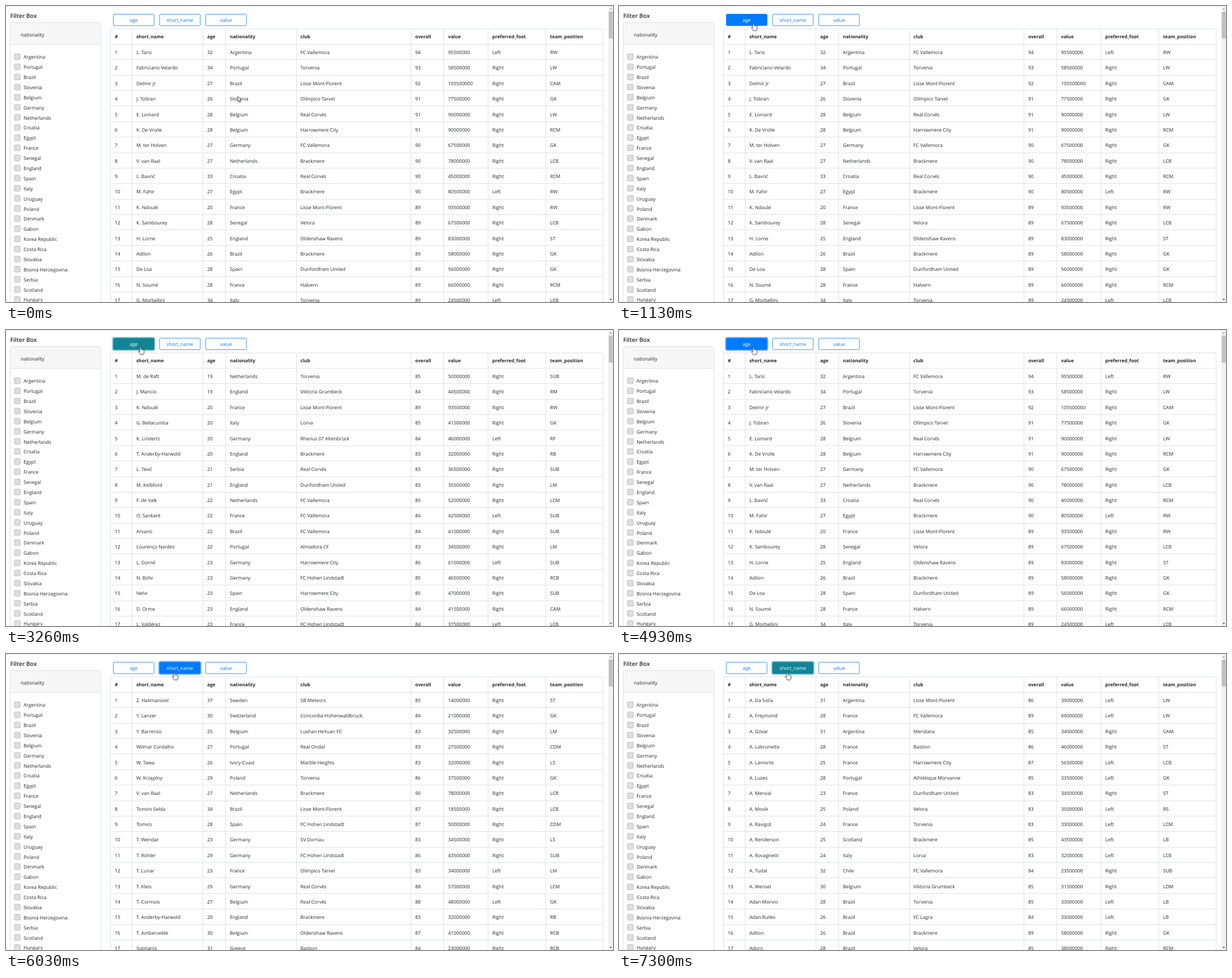
An HTML page that plays this animation: 1071 by 523 pixels, repeating every 8000 ms.

```html
<!DOCTYPE html>
<html lang="en">
<head>
<meta charset="utf-8">
<title>Filter and sort table</title>
<style>
:root { --blue: #007bff; --clear: #007bff00; --line: #3395ff; --teal: #138496; --ring: #007bff80; --tealring: #17a2b880; }
html, body { margin: 0; width: 100%; height: 100%; overflow: hidden; background: #fff; }
svg { display: block; width: 1071px; height: 523px; }
text { font: 8.46px 'Open Sans', sans-serif; fill: #212529; text-rendering: geometricPrecision; white-space: pre; }
.title { font-size: 10.3px; font-weight: 600; }
.head { font-size: 8.2px; font-weight: 700; }
.grid { fill: none; stroke: #dee2e6; }
.box { fill: #dedede; stroke: #b9b9b9; stroke-width: .9; }
.button { fill: var(--clear); stroke: var(--line); }
.label { fill: var(--blue); text-anchor: middle; }
.ring { fill: none; stroke: var(--clear); stroke-width: 1.8; }
.hand, .arrow { fill: #fff; stroke: #111; stroke-width: .8; stroke-linejoin: round; }

.view, .hand, .arrow, #pointer, .button, .label, .ring { animation: 8s ease-in-out infinite; }
.view, .hand, .arrow { animation-timing-function: step-end; }
.view { visibility: hidden; }
#ranked { animation-name: ranked; }
#oldest { animation-name: oldest; }
#youngest { animation-name: youngest; }
#za { animation-name: za; }
#az { animation-name: az; }
@keyframes ranked { 0%, 53.75% { visibility: visible } 28.75%, 75.125%, 100% { visibility: hidden } }
@keyframes oldest { 28.75% { visibility: visible } 0%, 38.75%, 100% { visibility: hidden } }
@keyframes youngest { 38.75% { visibility: visible } 0%, 53.75%, 100% { visibility: hidden } }
@keyframes za { 75.125% { visibility: visible } 0%, 88.75%, 100% { visibility: hidden } }
@keyframes az { 0% { visibility: hidden } 88.75%, 100% { visibility: visible } }

#pointer { animation-name: move; }
.hand { animation-name: hand; }
.arrow { animation-name: arrow; }
@keyframes move {
  0%, 3.75% { transform: translate(408.7px, 159.5px); animation-timing-function: ease; }
  14.125%, 61.6% { transform: translate(237.2px, 29.5px); animation-timing-function: ease-in; }
  64.375% { transform: translate(256px, 35.5px); animation-timing-function: linear; }
  66.875% { transform: translate(282px, 41px); animation-timing-function: linear; }
  69.175% { transform: translate(296.5px, 34px); animation-timing-function: ease-out; }
  70.75%, 100% { transform: translate(297.2px, 31.8px); }
}
@keyframes hand { 0%, 64.375% { visibility: hidden } 11.75%, 69.175%, 100% { visibility: visible } }
@keyframes arrow { 0%, 64.375% { visibility: visible } 11.75%, 69.175%, 100% { visibility: hidden } }

#age .button { animation-name: age-fill; }
#age .label { animation-name: age-text; }
#age .ring { animation-name: age-ring; }
@keyframes age-fill {
  0%, 11.75%, 66.25%, 100% { fill: var(--clear); stroke: var(--line); }
  13.625%, 38.75%, 55.625%, 64.375% { fill: var(--blue); stroke: var(--blue); }
  40.625%, 53.75% { fill: var(--teal); stroke: var(--teal); }
}
@keyframes age-text {
  0%, 11.75%, 66.25%, 100% { fill: var(--blue); }
  13.625%, 64.375% { fill: #fff; }
}
@keyframes age-ring {
  0%, 26.6%, 75.125%, 100% { stroke: var(--clear); }
  27.375%, 38.75%, 55.625%, 73.25% { stroke: var(--ring); }
  40.625%, 53.75% { stroke: var(--tealring); }
}

#short_name .button { animation-name: name-fill; }
#short_name .label { animation-name: name-text; }
#short_name .ring { animation-name: name-ring; }
@keyframes name-fill {
  0%, 69.175% { fill: var(--clear); stroke: var(--line); }
  71.05%, 88.75% { fill: var(--blue); stroke: var(--blue); }
  90.625%, 100% { fill: var(--teal); stroke: var(--teal); }
}
@keyframes name-text { 0%, 69.175% { fill: var(--blue) } 71.05%, 100% { fill: #fff } }
@keyframes name-ring {
  0%, 73.25% { stroke: var(--clear); }
  75.125%, 88.75% { stroke: var(--ring); }
  90.625%, 100% { stroke: var(--tealring); }
}
</style>
</head>
<body>
<svg id="stage" viewBox="0 0 1071 523"></svg>
<script>
const countries = ['Argentina', 'Portugal', 'Brazil', 'Slovenia', 'Belgium', 'Germany', 'Netherlands',
  'Croatia', 'Egypt', 'France', 'Senegal', 'England', 'Spain', 'Italy', 'Uruguay', 'Poland', 'Denmark',
  'Gabon', 'Korea Republic', 'Costa Rica', 'Slovakia', 'Bosnia Herzegovina', 'Serbia', 'Scotland', 'Hungary'];

// name | age | nationality | club | overall | value in millions | foot | position
const players = `L. Tarsi|32|Argentina|FC Vallemora|94|95.5|L|RW
Fabriciano Velardo|34|Portugal|Torvenia|93|58.5|R|LW
Delmir Jr|27|Brazil|Lisse Mont-Florent|92|105.5|R|CAM
J. Tobran|26|Slovenia|Olímpico Tarvel|91|77.5|R|GK
E. Lomard|28|Belgium|Real Corvés|91|90|R|LW
K. De Vrolle|28|Belgium|Harrowmere City|91|90|R|RCM
M. ter Holven|27|Germany|FC Vallemora|90|67.5|R|GK
V. van Raal|27|Netherlands|Brackmere|90|78|R|LCB
L. Bavrić|33|Croatia|Real Corvés|90|45|R|RCM
M. Fahir|27|Egypt|Brackmere|90|80.5|L|RW
K. Ndoulé|20|France|Lisse Mont-Florent|89|93.5|R|RW
K. Sambourey|28|Senegal|Velora|89|67.5|R|LCB
H. Lorne|25|England|Oldenshaw Ravens|89|83|R|ST
Adilon|26|Brazil|Brackmere|89|58|R|GK
De Loa|28|Spain|Dunfordham United|89|56|R|GK
N. Soumé|28|France|Halvern|89|66|R|RCM
G. Morbellini|34|Italy|Torvenia|89|24.5|L|LCB
Severo Lamos|33|Spain|Real Corvés|89|31.5|R|LCB
L. Soldez|32|Uruguay|FC Vallemora|89|53|R|ST
A. Freymond|28|France|FC Vallemora|89|69|L|LW
S. Vandarič|34|Slovenia|Solen|88|26|R|GK
M. Nauber|33|Germany|FC Hohen Lindstadt|88|32|R|GK
D. Gadén|33|Uruguay|Solen|88|28|R|CB
Damián Solva|33|Spain|Harrowmere City|88|40|L|LCM
Prade|32|Spain|FC Vallemora|88|42|R|RCB
E. Caloni|32|Uruguay|Lisse Mont-Florent|88|48|R|ST
T. Kleis|29|Germany|Real Corvés|88|57|R|LCM
T. Cormois|27|Belgium|Real Corvés|88|48|L|GK
Jorlandinho|34|Brazil|Harrowmere City|87|19.5|R|CDM
Tomiro Selda|34|Brazil|Lisse Mont-Florent|87|18.5|R|LCB
Tomiro|28|Spain|FC Hohen Lindstadt|87|50|R|CDM
T. Ambervelde|30|Belgium|Oldenshaw Ravens|87|41|R|RCB
A. Lamorte|25|France|Harrowmere City|87|56.5|L|LCB
W. Krzęplny|29|Poland|Torvenia|86|37.5|R|GK
T. Röhler|29|Germany|FC Hohen Lindstadt|86|43.5|R|SUB
A. Da Solía|31|Argentina|Lisse Mont-Florent|86|39|L|LW
A. Labrunette|28|France|Bastion|86|46|R|ST
L. Dorné|23|Germany|Harrowmere City|86|61|L|SUB
Z. Halimanović|37|Sweden|SB Meteors|85|14|R|ST
M. de Raft|19|Netherlands|Torvenia|85|50|R|SUB
G. Bellacumba|20|Italy|Lorva|85|41.5|R|GK
F. de Valk|22|Netherlands|FC Vallemora|85|52|R|LCM
N. Böhr|23|Germany|FC Hohen Lindstadt|85|46.5|R|RCB
Nelvi|23|Spain|Harrowmere City|85|47|R|SUB
A. Góvar|31|Argentina|Meridana|85|34|R|CAM
A. Luzes|28|Portugal|Athlétique Morvanne|85|33.5|L|GK
A. Renderson|25|Scotland|Brackmere|85|43.5|L|LB
A. Wensel|30|Belgium|Viktoria Grumbeck|85|31.5|R|LDM
Adan Morvio|28|Brazil|Torvenia|85|33|L|LB
Adoro|28|Brazil|Velora|85|38|R|RCM
F. Bragadella|36|Italy|Calvadria|84|12.5|R|ST
E. Bražo|33|Bosnia Herzegovina|Nuva|84|20|R|ST
J. Mancio|19|England|Viktoria Grumbeck|84|44.5|R|RM
K. Lindertz|20|Germany|Rhenus 07 Altenbrück|84|46|L|RF
O. Sankaré|22|France|FC Vallemora|84|42.5|L|SUB
Arvano|22|Brazil|FC Vallemora|84|41|R|SUB
D. Orme|23|England|Oldenshaw Ravens|84|41.5|R|CAM
L. Valdérez|23|France|FC Hohen Lindstadt|84|37.5|L|LCB
Y. Lanzer|30|Switzerland|Concordia Hohenwaldbrück|84|21|R|GK
Sophanis|31|Greece|Bastion|84|23|R|RCB
A. Tudal|32|Chile|FC Vallemora|84|23.5|R|SUB
Adan Rulles|26|Brazil|FC Lagra|84|33|L|LB
T. Anderby-Harwold|20|England|Brackmere|83|32|R|RB
L. Tević|21|Serbia|Real Corvés|83|36.5|R|SUB
M. Kelbford|21|England|Dunfordham United|83|35.5|R|LM
Lourenço Nardes|22|Portugal|Almadora CF|83|34.5|R|LM
Y. Barrenzo|25|Belgium|Lushan HeYuan FC|83|32.5|R|LM
Wilmar Cordalho|27|Portugal|Real Ondal|83|27.5|R|CDM
W. Tawa|26|Ivory Coast|Marble Heights|83|32|R|LS
T. Wendar|23|Germany|SV Dornau|83|34.5|R|LS
T. Lunar|23|France|Olímpico Tarvel|83|34|L|LM
A. Mervial|23|France|Dunfordham United|83|34.5|R|ST
A. Mosik|25|Poland|Velora|83|35|L|RS
A. Ravigot|24|France|Torvenia|83|33|L|LCM
A. Rovagnetti|24|Italy|Lorva|83|32|L|LCB`.split('\n').map(line => {
  const [name, age, nation, club, overall, millions, foot, position] = line.split('|');
  return [name, age, nation, club, overall, millions * 1e6, foot === 'L' ? 'Left' : 'Right', position];
});

const byAge = (a, b) => a[1] - b[1];
const byName = (a, b) => a[0] < b[0] ? -1 : 1;
const views = {
  ranked: () => 0,
  oldest: (a, b) => byAge(b, a),
  youngest: byAge,
  za: (a, b) => byName(b, a),
  az: byName
};

const headings = ['#', 'short_name', 'age', 'nationality', 'club', 'overall', 'value', 'preferred_foot', 'team_position'];
const columns = [184.5, 222.5, 347.5, 387.5, 512, 714.5, 772.5, 850.5, 952.5];
const rowHeight = 27.38;

const text = (x, y, content, style = '') => `<text x="${x}" y="${y}" class="${style}">${content}</text>`;
const rect = (x, y, w, h, attrs) => `<rect x="${x}" y="${y}" width="${w}" height="${h}" ${attrs}/>`;
const cells = (values, y, style) => values.map((v, i) => text(columns[i] + 7.5, y, v, style)).join('');

function sidebar() {
  const items = countries.map((name, i) => {
    const y = 89.7 + i * 17.88;
    return rect(14.9, y - 5.2, 10.2, 10.2, 'rx="1.3" class="box"') + text(31, y + 3.6, name);
  });
  return text(7.5, 20.6, 'Filter Box', 'title')
    + rect(7.5, 29.5, 160, 520, 'rx="2" fill="#fff" stroke="#dfdfdf"')
    + rect(8, 30, 159, 37.5, 'fill="#f7f7f7"')
    + '<path d="M7.5 68H167.5" stroke="#dfdfdf"/>'
    + text(26, 53.6, 'nationality') + items.join('');
}

function button(label, x) {
  return `<g id="${label}">` + rect(x - .9, 13.1, 74.3, 22.8, 'rx="3" class="ring"')
    + rect(x + .4, 14.4, 71.8, 20.3, 'rx="1.8" class="button"')
    + text(x + 36.3, 27.8, label, 'label') + '</g>';
}

function grid() {
  let path = 'M184.5 40.5H1053.5V530';
  for (const x of columns) path += `M${Math.floor(x) + .5} 40V530`;
  for (let i = 0; i < 17; i++) path += `M184 ${Math.round(67.9 + i * rowHeight) - .5}H1054`;
  return `<path class="grid" d="${path}"/>` + cells(headings, 57, 'head');
}

function view([id, order]) {
  const rows = [...players].sort(order).slice(0, 17);
  return `<g id="${id}" class="view">`
    + rows.map((row, i) => cells([i + 1, ...row], 85 + i * rowHeight)).join('') + '</g>';
}

const scrollbar = rect(1062.5, 0, 8.5, 523, 'fill="#f1f1f1"')
  + rect(1063.5, 10, 7, 47.5, 'fill="#c1c1c1"')
  + '<path d="M1064.8 6.2l2.2-2.6 2.2 2.6z" fill="#a3a3a3"/><path d="M1064.8 517.5l2.2 2.6 2.2-2.6z" fill="#505050"/>';

const pointer = `<g id="pointer">
  <path class="arrow" d="M0 0V9.3L2.1 7.4 3.6 10.8 5 10.2 3.6 6.9H6.5Z"/>
  <path class="hand" d="M-1.1 1Q0-.6 1.1 1V5Q2.2 4.3 3 5.3Q4.1 4.8 4.8 5.8Q6 5.4 6.4 6.8V10Q6.2 12 5 14H-.5Q-2.2 10.5-3.8 8.5Q-3.6 7-2.2 7.8L-1.1 9Z"/>
</g>`;

document.getElementById('stage').innerHTML = rect(0, 0, 1071, 1, 'fill="#e6e6e6"')
  + sidebar() + grid() + Object.entries(views).map(view).join('')
  + button('age', 189) + button('short_name', 270.5) + button('value', 352)
  + scrollbar + pointer;
</script>
</body>
</html>
```
